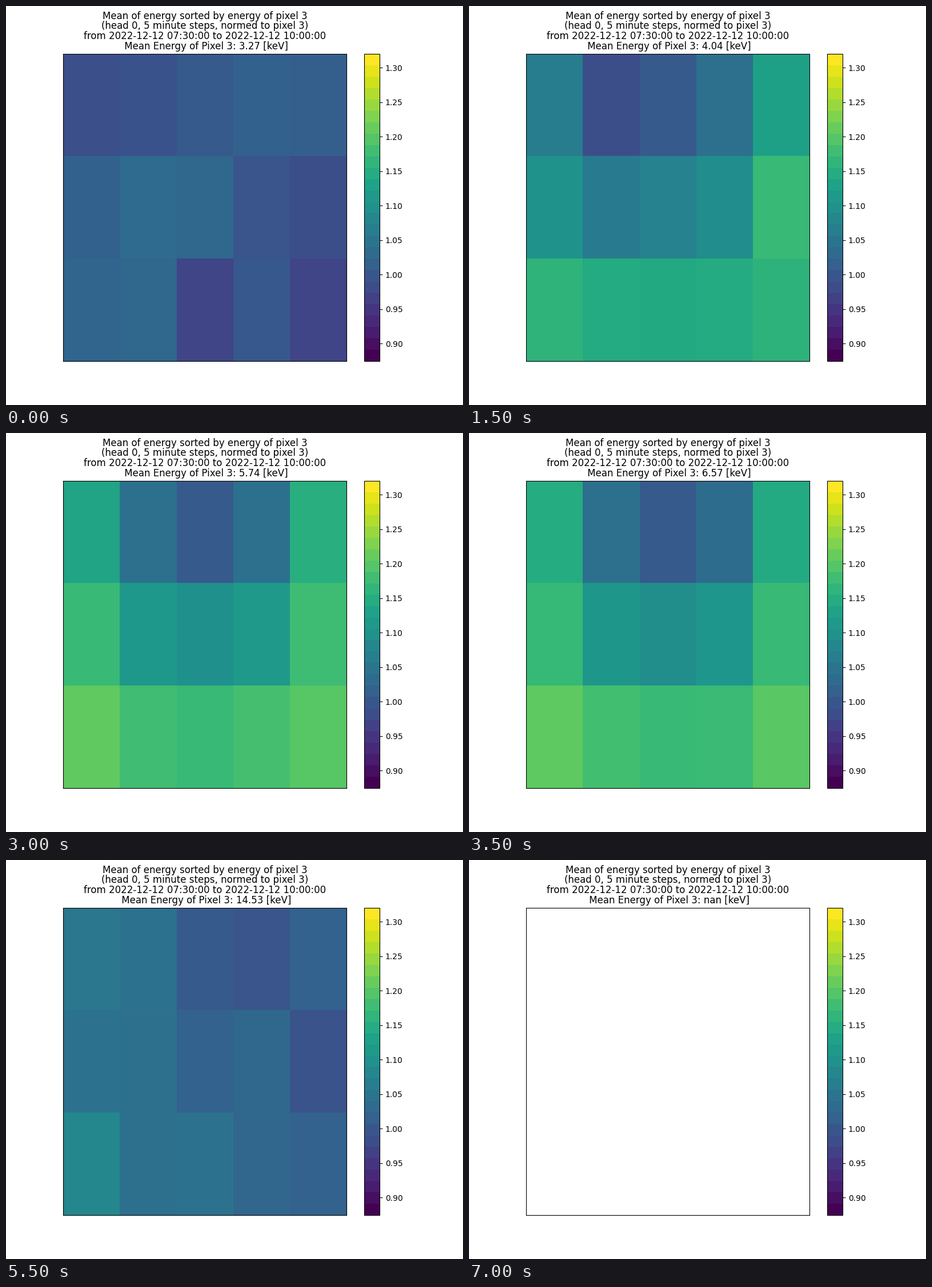
A matplotlib script that plays this animation: 800 by 700 pixels, repeating every 8000 ms.

```python
import numpy as np
import matplotlib.pyplot as plt
from matplotlib.animation import FuncAnimation
from matplotlib.cm import ScalarMappable

VMIN, VMAX = 0.8744, 1.32
STEPS = 16      # half-second steps
LAST = 13       # last step that holds data
BANDS = 27      # flat tones in the colour bar

HEADER = ("Mean of energy sorted by energy of pixel 3\n"
          "(head 0, 5 minute steps, normed to pixel 3)\n"
          "from 2022-12-12 07:30:00 to 2022-12-12 10:00:00\n")

# Key points over the steps: energy in keV and the shape of the excess
KEYS = [0, 2, 4, 7, 9, 11, LAST]
ENERGY = [3.27, 3.71, 4.39, 6.57, 10.9, 14.53, 18.42]
RISE = [0.006, 0.053, 0.095, 0.088, 0.017, 0.015, 0.015]    # per row downwards
EDGE = [0, 0.06, 0.12, 0.15, 0.06, 0.035, 0.03]             # outer columns
SKEW = [0, 0.016, 0.007, 0, 0, -0.008, -0.01]               # left to right
TWIST = [0.01, 0.01, 0.009, 0, 0, 0, 0]                     # between corners

row, col = np.mgrid[0:3, -2:3]


def energy_at(step):
    if step > LAST:
        return float("nan")
    return float(np.exp(np.interp(step, KEYS, np.log(ENERGY))))


def grid_at(step):
    """Energies relative to the top middle pixel, which stays at 1."""
    if step > LAST:
        return np.full(row.shape, np.nan)
    rise, edge, skew, twist = (np.interp(step, KEYS, values)
                               for values in (RISE, EDGE, SKEW, TWIST))
    noise = np.random.default_rng(step).normal(size=row.shape)
    noise *= 0.02 * (1 - rise / 0.12)
    noise[0, 2] = 0
    return (1 + rise * row
            + edge * (col / 2) ** 2 * (1 - 0.4 * row)
            + skew * col
            - twist * (row - 1) * col
            + noise)


fig, ax = plt.subplots(figsize=(8, 7), dpi=100)
image = ax.imshow(grid_at(0), cmap="viridis", vmin=VMIN, vmax=VMAX,
                  aspect="auto", interpolation="nearest")
ax.set_xticks([])
ax.set_yticks([])
title = ax.set_title(HEADER, linespacing=0.98)

banded = ScalarMappable(norm=image.norm, cmap=plt.get_cmap("viridis", BANDS))
fig.colorbar(banded, ax=ax)


def update(step):
    image.set_data(grid_at(step))
    energy = round(energy_at(step), 2)
    title.set_text(f"{HEADER} Mean Energy of Pixel 3: {energy} [keV]")
    return image, title


anim = FuncAnimation(fig, update, frames=STEPS, interval=500, repeat=True,
                     repeat_delay=0, blit=False)
plt.show()
```
